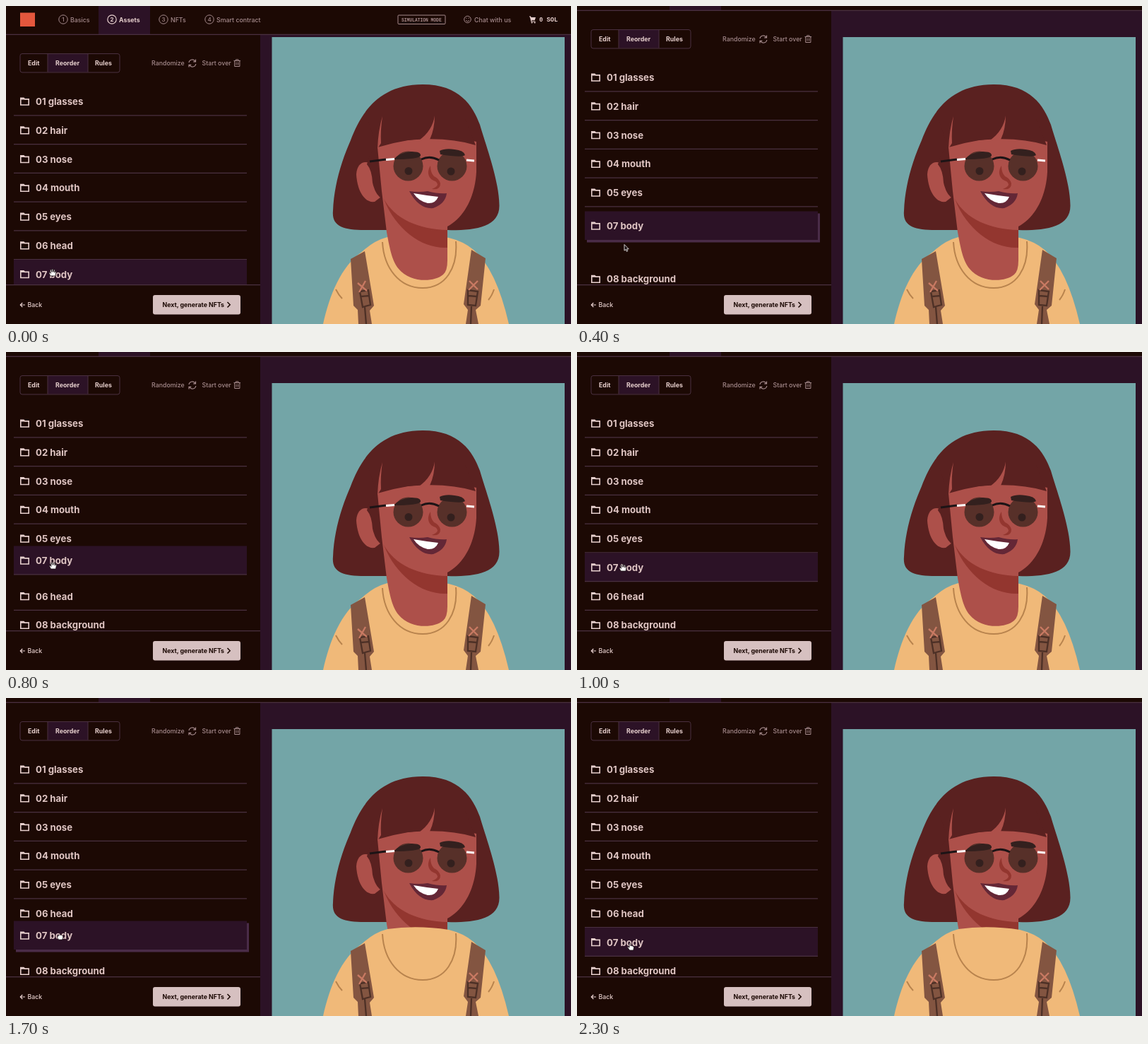
An HTML page that plays this animation: 800x450 px, repeating every 2.4 s.

```html
<!DOCTYPE html>
<html lang="en">
<head>
<meta charset="utf-8">
<title>Reorder layers</title>
<style>
html, body { margin: 0; width: 100%; height: 100%; overflow: hidden; background: #1c0904; }
svg { display: block; width: 800px; height: 450px; }
text { font: 500 8.8px Inter, Arial, sans-serif; fill: #e6cfcd; }
.dim { fill: #a58a8c; }
.b { font-weight: 700; }
.mono { font-family: "Liberation Mono", "DejaVu Sans Mono", monospace; font-weight: 700; }
.row text { font-size: 13.2px; font-weight: 700; fill: #dfc5c3; }
.line { fill: none; stroke: #e6cfcd; stroke-width: 1.2; }
.soft { fill: none; stroke: #a58a8c; stroke-width: 1; }
.rule { fill: none; stroke: #4a3040; stroke-width: 1.3; }
.plum { fill: #2c1226; }
.skin { fill: #ad504a; }
.hair { fill: #5a2120; }
.shade { fill: #93362f; }
.ink { fill: #33201e; }
.strap { fill: #835541; }
.cur { fill: #fff; stroke: #1a1012; stroke-width: .8; stroke-linejoin: round; }
.arrow { fill: #1a1012; stroke: #fff; }
</style>
</head>
<body>
<svg viewBox="0 0 800 450">
  <rect width="800" height="450" fill="#1c0904"/>
  <rect class="plum" x="360" width="440" height="450"/>

  <g id="page">
    <rect width="800" height="40" fill="#1c0904"/>
    <rect class="plum" x="131" width="73" height="40"/>
    <path class="rule" d="M0 40.4H800"/>
    <rect x="20" y="9.5" width="21" height="19.5" fill="#e4573d"/>
    <g id="steps"></g>
    <rect class="soft" x="555" y="13" width="67" height="12.5" rx="1"/>
    <text class="mono dim" x="560" y="21.6" style="font-size:6.3px">SIMULATION MODE</text>
    <g class="soft"><circle cx="653.5" cy="19" r="4.8"/><path d="M651 20.5q2.5 2.6 5 0M651.8 16.6v1.2M655.2 16.6v1.2"/></g>
    <text class="dim" x="663" y="22.5">Chat with us</text>
    <path d="M741 14.5h2l.6 1.5h6.4l-1.3 4.3h-4.6l.4 1.2h5v1h-6l-1.7-6.9H741z" fill="#e6cfcd"/>
    <g fill="#e6cfcd"><circle cx="744.6" cy="23.4" r="1"/><circle cx="748.7" cy="23.4" r="1"/></g>
    <text class="mono" x="755" y="22.4">0 SOL</text>

    <rect class="plum" x="59" y="67.5" width="57" height="26"/>
    <rect class="rule" x="20" y="67.5" width="141" height="26.5" rx="3" style="stroke-width:1"/>
    <path class="rule" d="M59 67.5v26M116 67.5v26" style="stroke-width:1"/>
    <text class="b" x="31" y="84">Edit</text>
    <text class="b" x="70" y="84">Reorder</text>
    <text class="b" x="126" y="84">Rules</text>
    <text class="dim" x="206" y="84">Randomize</text>
    <path class="soft" d="M259 80a4.8 4.8 0 0 1 9-1.5M268.5 75.5v3.3h-3.3M268.8 82a4.8 4.8 0 0 1-9 1.5M259 86.5v-3.2h3.3" style="stroke-width:1.2"/>
    <text class="dim" x="277.5" y="84">Start over</text>
    <path class="soft" d="M322.5 77.5h9.5M325.5 77.5v-1.7h3.5v1.7M323.7 77.5v8h7.2v-8M326 79.5v4M328.6 79.5v4"/>
    <g id="rows"></g>
  </g>

  <rect y="394" width="360" height="56" fill="#1c0904"/>
  <path class="rule" d="M0 394.7H360"/>
  <path class="line" d="M27 423H20.5M23.3 420l-3 3 3 3"/>
  <text x="30.5" y="426">Back</text>
  <rect x="208" y="409" width="124" height="27.5" rx="3" fill="#d6c0c0"/>
  <text class="b" x="221.5" y="426" style="fill:#1c0904">Next, generate NFTs</text>
  <path d="M313.5 419l3.7 3.800-3.700 3.800" fill="none" stroke="#1c0904" stroke-width="1.5"/>

  <rect x="376.5" y="44" width="414.500" height="406" fill="#73a5a7"/>
  <path class="hair" d="M463 290C464 254 476 217 488 190C503 150 529 111 590 111C642 111 661 141 671 168C679 196 698 246 698.500 282C699 314 662 318 620 317L508 317C477 317 461 311 463 290Z"/>
  <g id="body">
    <path d="M449 450C458 410 474 368 505 347Q521 332 540 327Q582 321 627 328Q648 333 662 345Q694 372 712 450Z" fill="#f0b979"/>
    <path d="M533 334C535 371 557 399 590 399C622 399 640 371 637 333M467 401q4 8 9 13M691 401q-3 9-8 15" fill="none" stroke="#b8834d" stroke-width="2"/>
    <path class="strap" d="M488 358L508 347L521 424L515 431L518 450H499L498 430L492 424ZM659 345L679 357L672 424L665 430L669 450H651L654 430L648 422Z"/>
    <path d="M501 404l12-2 3 21-11 3zM654 402l14 2-3 20-11-1zM503 411l11-1M655 410l11 1M508 426l2 24M659 425l-1 25" fill="none" stroke="#4d3026" stroke-width="2.3"/>
    <path d="M498 392l13 11M509 389l-9 16M656 389l12 12M668 389l-13 13" stroke="#c97a63" stroke-width="2.3"/>
  </g>
  <g id="head">
    <path class="skin" d="M532 262L539 320C544 347 547 361 556 372C571 391 605 392 619 380Q625 375 625 360V312C649 299 664 270 666 235V192Q600 178 526 200Z"/>
    <path class="shade" d="M535 273C550 301 584 316 625 317V342C590 344 552 317 535 273Z"/>
  </g>
  <path class="skin" d="M518 224C508 217 497 222 496 238C497 260 507 279 522 277L531 270Z"/>
  <path class="hair" d="M511 224Q516 206 526 195Q524 216 528 240Q529 260 533 273Q523 268 519 250Q518 232 511 224Z"/>
  <path class="hair" d="M512 160H650L665 197Q628 186 582 189Q552 190 525 200Z"/>
  <path class="skin" d="M533 156Q527 176 526 202L531 194Q530 176 533 156ZM607 155Q604 176 585 190L600 189Q607 174 607 155Z"/>
  <path class="shade" d="M601 226C594 237 600 246 608 248Q616 254 603 259Q615 261 615 251Q613 244 606 241Q601 236 601 226Z"/>
  <path d="M571 262Q585 264 597 262Q612 266 624 265Q622 280 605 286Q585 288 571 262Z" fill="#642736"/>
  <path d="M577 265Q594 268 612 270Q608 280 597 279Q584 276 577 265Z" fill="#fff"/>
  <g fill="#573029"><circle cx="569.5" cy="226.5" r="21"/><circle cx="631.5" cy="226.5" r="21"/></g>
  <path class="ink" d="M549 217Q556 208 574 206Q588 206 587 212Q584 217 549 217ZM614 205Q622 201 635 203Q648 204 650 211Q645 215 615 210Z"/>
  <circle class="ink" cx="570" cy="233.5" r="5.5"/><circle class="ink" cx="630" cy="234" r="5.5"/>
  <g fill="none" stroke-width="3">
    <path d="M515 220L538 217M588 217Q600 211 613 218" stroke="#1d1416"/>
    <path d="M538 217.500L550 216.500M652 218L663 219" stroke="#fff"/>
  </g>
  <g id="cursor">
    <path class="cur" d="M-3 4L-5 0q0-1.5 1.5-.8l1 1.2-1-4.6q.7-1.5 1.7 0l.8 2.6-.1-3.6q1-1.2 1.7 0l.4 3.6.7-3q1.1-1 1.5.3l-.4 3.5 1-1.5q1.3-.5 1.2.8L4 4z"/>
    <path class="cur" d="M-2.5 4l-1.8-3q-.2-1.8 1-1.7-.2-2 1.6-1.7 1-1.2 2 0 1.2-.8 1.9.3 1.5-.2 1.5 1.5V2L2.5 4z"/>
    <path class="cur arrow" d="M-1-4.500v8.700l2-1.800 1.300 3 1.500-.7-1.300-2.900h2.700z"/>
    <path class="cur" d="M-1.5 5l-3-4.300q.3-1.700 1.800-.3l.7.8v-6q.9-1.300 1.800 0v3.300q1.200-.6 1.800.3 1.300-.3 1.700.7 1.400 0 1.300 1.500L3.800 5z"/>
  </g>
</svg>
<script>
const $ = id => document.getElementById(id);
const page = $('page'), body = $('body'), head = $('head'), cursor = $('cursor');
const slot = i => 135 + 40.75 * i;

$('steps').innerHTML = [[81, 'Basics'], [150, 'Assets'], [223, 'NFTs'], [288, 'Smart contract']].map(([x, name], i) => {
  const on = i === 1;
  return `<circle class="${on ? 'line' : 'soft'}" cx="${x}" cy="19" r="6.2"/>
    <text class="${on ? 'b' : 'dim'}" x="${x}" y="22" text-anchor="middle" style="font-size:8px">${i + 1}</text>
    <text class="${on ? 'b' : 'dim'}" x="${x + 10}" y="22.5">${name}</text>`;
}).join('');

$('rows').innerHTML = 'glasses hair nose mouth eyes head background body'.split(' ').map((name, i) => {
  const moved = name === 'body';
  const num = moved ? 7 : name === 'background' ? 8 : i + 1;
  return `<g class="row" transform="translate(0 ${slot(num - 1)})">
    ${moved ? '<rect id="shadow" x="14" y="-17.5" width="330" height="41" fill="#4a2c48"/><rect class="plum" x="11" y="-20.5" width="330" height="40.5"/>' : ''}
    <path class="rule" d="M11 19.800H341"/>
    <path class="line" d="M20.800 -4.800h4.200l1.500 1.700h5.700v8.100h-11.400zM20.800 -3.300h5" style="stroke-width:1.600"/>
    <text x="42" y="5">0${num} ${name}</text></g>`;
}).join('');
const rows = $('rows').children, headRow = rows[5], bodyRow = rows[7];
const shadow = $('shadow'), bodyRule = bodyRow.querySelector('path');

// Linear interpolation through time, value, time, value, ...
function at(t, ...keys) {
  let i = 0;
  while (i + 2 < keys.length && keys[i + 2] <= t) i += 2;
  if (i + 2 >= keys.length) return keys[i + 1];
  const [t0, a, t1, b] = keys.slice(i, i + 4);
  return a + (b - a) * (t - t0) / (t1 - t0);
}
const move = (el, x, y) => el.setAttribute('transform', `translate(${x} ${y})`);
const show = (el, on) => el.setAttribute('visibility', on ? 'visible' : 'hidden');

let bodyOnTop = false;
function draw(now) {
  const t = Math.floor(now % 2400 / 100) * 100;
  const dragging = t >= 100 && t < 800 || t >= 1400 && t < 1800;
  move(page, 0, -at(t, 0, 0, 100, 2, 200, 12, 300, 25, 400, 34));
  move(bodyRow, 0, at(t, 0, slot(6), 200, slot(6), 400, 345, 600, 300, 700, 305, 800, 329, 900, slot(5), 1400, slot(5), 1700, 370, 1800, 378.5, 1900, slot(6)));
  move(headRow, 0, at(t, 0, slot(5), 400, slot(5), 600, slot(6), 1500, slot(6), 1700, slot(5)));
  show(shadow, dragging);
  show(bodyRule, !dragging);

  move(cursor, at(t, 0, 66, 200, 66, 400, 68, 600, 68, 1000, 65, 1400, 67, 1700, 77, 2300, 76),
    at(t, 0, 378, 200, 378, 400, 342, 600, 300, 1000, 306, 1400, 307, 1700, 338, 1900, 352));
  const kind = t < 100 ? 0 : t < 300 ? 1 : t < 800 ? 2 : t < 1300 ? 0 : t < 1800 ? 1 : 3;
  [...cursor.children].forEach((c, i) => show(c, i === kind));

  const top = t >= 1200;
  if (top !== bodyOnTop) {
    if (top) head.after(body); else head.before(body);
    bodyOnTop = top;
  }
}
const start = performance.now();
function tick(now) {
  draw(Math.max(0, now - start));
  requestAnimationFrame(tick);
}
requestAnimationFrame(tick);
</script>
</body>
</html>
```
